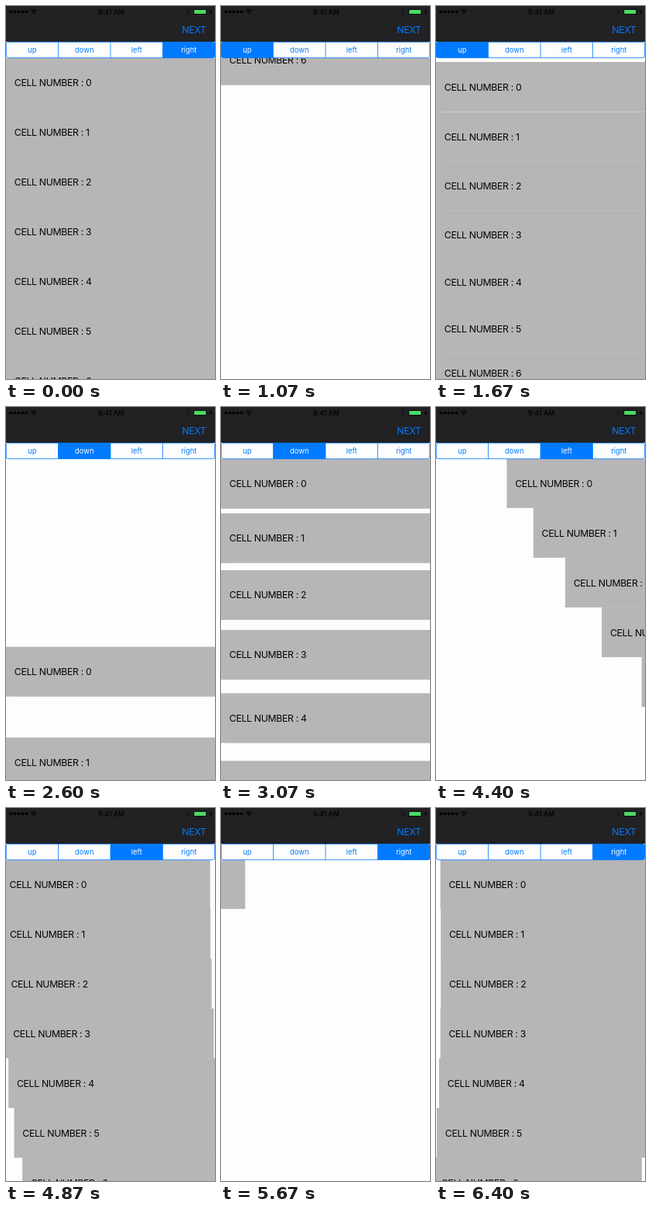
An HTML page that plays this animation: 270 by 480 pixels, repeating every 6470 ms.

```html
<!DOCTYPE html>
<html lang="en">
<head>
<meta charset="utf-8">
<title>Table cell animations</title>
<style>
  html, body { margin: 0; width: 100%; height: 100%; overflow: hidden; background: #fefdfe; }
  svg { display: block; width: 100vw; height: 100vh; }
  text { font-family: Inter, "Liberation Sans", sans-serif; }
  .body { font-size: 12.24px; letter-spacing: -.31px; }
  .tab { font-size: 9.36px; text-anchor: middle; }
  .clock { font-size: 8.64px; font-weight: 600; text-anchor: middle; }
</style>
</head>
<body>
<svg viewBox="0 0 270 480" xmlns="http://www.w3.org/2000/svg">
  <defs>
    <clipPath id="tableClip"><rect y="67" width="270" height="413"/></clipPath>
    <clipPath id="barClip"><rect y="46.1" width="270" height="20.9" rx="2.9"/></clipPath>
  </defs>
  <rect width="270" height="480" fill="#fefdfe"/>
  <g clip-path="url(#tableClip)"><g id="rows"></g></g>

  <rect width="270" height="46" fill="#222124"/>
  <g id="dots" fill="#050505"></g>
  <g fill="none" stroke="#050505" stroke-width="1.3">
    <path d="M32 6.4a5.6 5.6 0 0 1 8 0M33.6 8.2a3.4 3.4 0 0 1 4.8 0"/>
    <circle cx="36" cy="9.8" r=".5"/>
  </g>
  <text class="clock" x="136" y="10.6" fill="#050505">9:41 AM</text>
  <path d="M233.8 5.6l3.2 3.8-1.6 1.7V3.9l1.6 1.7-3.2 3.8" fill="none" stroke="#111" stroke-width=".6"/>
  <rect x="242.2" y="4" width="17" height="7" rx="1.2" fill="#0a0a0a"/>
  <rect x="243.2" y="5" width="15" height="5" rx=".5" fill="#4cd964"/>
  <path d="M259.8 6.2q1 .2 1 1.3t-1 1.3z" fill="#0a0a0a"/>
  <path d="M265.4 3.8l-3 4.2h1.8l-.7 3.3 3-4.3h-1.8z" fill="#050505"/>
  <text class="body" x="227.3" y="34.9" fill="#007aff">NEXT</text>

  <rect y="46" width="270" height="21" fill="#fefdfe"/>
  <g id="tabs" clip-path="url(#barClip)"></g>
  <rect x=".4" y="46.45" width="269.2" height="20.2" rx="2.6" fill="none" stroke="#007aff" stroke-width=".8"/>
</svg>
<script>
const LOOP = 6470, STEP = 1000 / 15;
const TOP = 66, ROW = 64, COUNT = 7;
const TRAVEL = 413, DELAY = 0.05;
const BLUE = '#007aff', WHITE = '#fefdfe';
const tabNames = ['up', 'down', 'left', 'right'];

// Tab tapped, time of the tap in ms, and the side the cells enter from
const taps = [
  { tab: 0, at: 756, dx: 0, dy: -1 },
  { tab: 1, at: 2387, dx: 0, dy: 1 },
  { tab: 2, at: 4009, dx: 1, dy: 0 },
  { tab: 3, at: 5450, dx: -1, dy: 0 }
];

function add(parent, tag, attrs, label) {
  const el = document.createElementNS('http://www.w3.org/2000/svg', tag);
  for (const key in attrs) el.setAttribute(key, attrs[key]);
  if (label) el.textContent = label;
  parent.appendChild(el);
  return el;
}

const byId = id => document.getElementById(id);

for (let i = 0; i < 5; i++) add(byId('dots'), 'circle', { cx: 6.2 + i * 5.1, cy: 7.5, r: 2.1 });

// Built last to first, so that earlier cells lie on top
const rows = [];
for (let i = COUNT - 1; i >= 0; i--) {
  const g = add(byId('rows'), 'g', {});
  add(g, 'rect', { width: 270, height: ROW, fill: '#b6b5b7' });
  add(g, 'rect', { x: 10.8, y: ROW - .5, width: 259.2, height: .5, fill: '#c4c3c7' });
  add(g, 'text', { class: 'body', x: 10.8, y: 36.5, fill: '#050505' }, 'CELL NUMBER : ' + i);
  rows[i] = g;
}

const tabs = tabNames.map((name, i) => {
  const x = i * 67.5;
  const box = add(byId('tabs'), 'rect', { x, y: 46, width: 67.5, height: 21 });
  if (i) add(byId('tabs'), 'rect', { x: x - .4, y: 46, width: .8, height: 21, fill: BLUE });
  const label = add(byId('tabs'), 'text', { class: 'tab', x: x + 33.75, y: 59.9 }, name);
  return { box, label };
});

// Remaining share of the way for a damped spring, t in seconds
function spring(t) {
  if (t <= 0) return 1;
  const damping = 0.8, omega = 6.05;
  const root = Math.sqrt(1 - damping * damping);
  const phase = root * omega * t;
  return Math.exp(-damping * omega * t) * (Math.cos(phase) + damping / root * Math.sin(phase));
}

function draw(time) {
  const now = Math.floor((time + 4) / STEP) * STEP;
  const tap = taps.filter(p => p.at <= now).pop();
  const active = tap ? tap.tab : 3;

  tabs.forEach(({ box, label }, i) => {
    box.setAttribute('fill', i === active ? BLUE : WHITE);
    label.setAttribute('fill', i === active ? WHITE : BLUE);
  });

  rows.forEach((g, i) => {
    const shift = tap ? TRAVEL * spring((now - tap.at) / 1000 - i * DELAY) : 0;
    const x = tap ? tap.dx * shift : 0;
    const y = TOP + i * ROW + (tap ? tap.dy * shift : 0);
    g.setAttribute('transform', `translate(${x.toFixed(2)} ${y.toFixed(2)})`);
  });
}

const start = performance.now();
function tick() {
  draw((performance.now() - start) % LOOP);
  requestAnimationFrame(tick);
}
tick();
</script>
</body>
</html>
```
